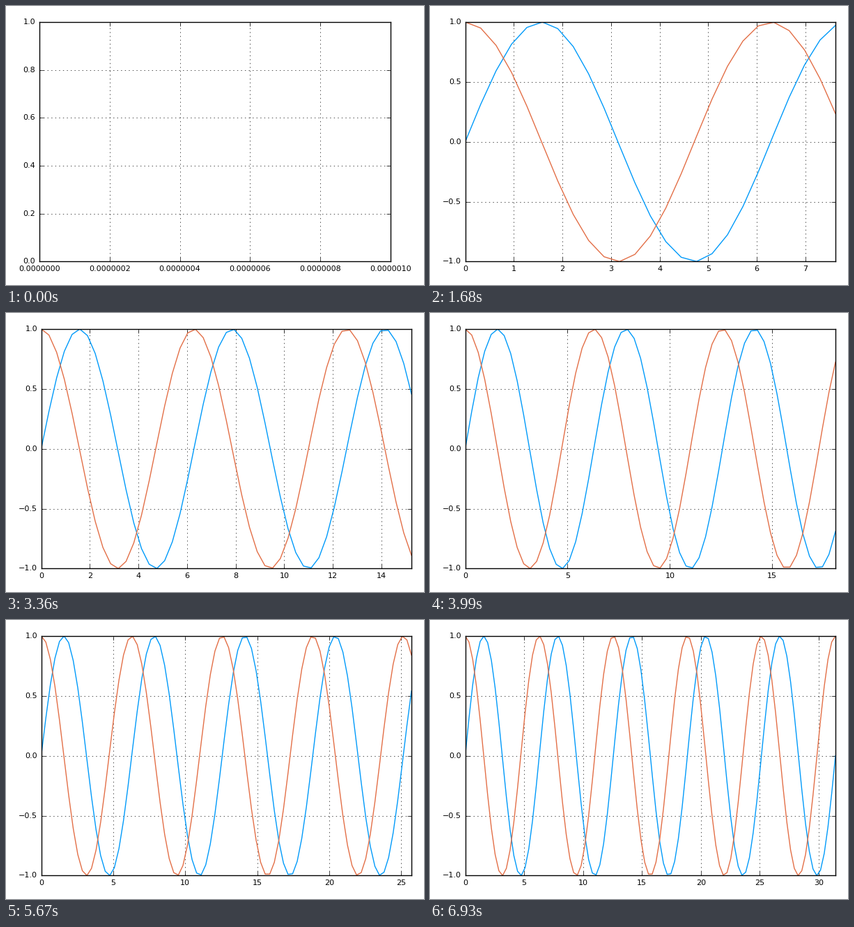
Recreate the animation shown at these times as a matplotlib script. Size 600 by 400 pixels, loop 7 s.

```python
import math

import numpy as np
import matplotlib.pyplot as plt
from matplotlib.animation import FuncAnimation

FRAMES = 100
INTERVAL = 70
MAX_BINS = 9

plt.style.use("classic")
plt.rcParams.update({
    "font.family": "DejaVu Sans",
    "font.size": 12,
    "xtick.labelsize": 8,
    "ytick.labelsize": 8,
    "figure.dpi": 100,
    "savefig.dpi": 100,
    "figure.facecolor": "white",
    "savefig.facecolor": "white",
})

fig, ax = plt.subplots(figsize=(6, 4), dpi=100)
ax.grid(True)
ax.set_axisbelow(True)

x = np.linspace(0, 10 * math.pi, FRAMES)
waves = [np.sin(x), np.cos(x)]
lines = [ax.plot([], [], color=color, lw=1)[0]
         for color in ("#009afa", "#e36f47")]


def nice_step(span):
    """Smallest 1-2-5 step that divides the span into at most MAX_BINS."""
    raw = span / MAX_BINS
    scale = 10.0 ** math.floor(math.log10(raw))
    return next(m * scale for m in (1, 2, 5, 10) if m * scale >= raw)


def scale_axis(lo, hi, pixels, set_ticks, set_lim):
    """Set limits and ticks; a tick up to half a pixel outside still counts."""
    step = nice_step(hi - lo)
    slack = 0.5 * (hi - lo) / pixels
    first = math.ceil((lo - slack) / step)
    last = math.floor((hi + slack) / step)
    ticks = [k * step for k in range(first, last + 1)]
    digits = max(0, -math.floor(math.log10(step)))
    labels = [f"{t:.{digits}f}".replace("-", "\u2212") for t in ticks]
    set_ticks(ticks, labels)
    set_lim(min(lo, ticks[0]), max(hi, ticks[-1]))


def draw(i):
    n = i + 1
    for line, wave in zip(lines, waves):
        line.set_data(x[:n], wave[:n])
    low = min(wave[:n].min() for wave in waves)
    high = max(wave[:n].max() for wave in waves)
    scale_axis(0, max(x[i], 1e-6), 531, ax.set_xticks, ax.set_xlim)
    scale_axis(low, high, 343, ax.set_yticks, ax.set_ylim)

    # Start from the same margins so the layout depends on the frame alone.
    fig.subplots_adjust(left=0.085, right=0.97, bottom=0.085, top=0.942)
    fig.tight_layout()
    return lines


anim = FuncAnimation(fig, draw, frames=FRAMES, init_func=lambda: draw(0),
                     interval=INTERVAL, repeat=True, repeat_delay=0,
                     blit=False)
plt.show()
```
